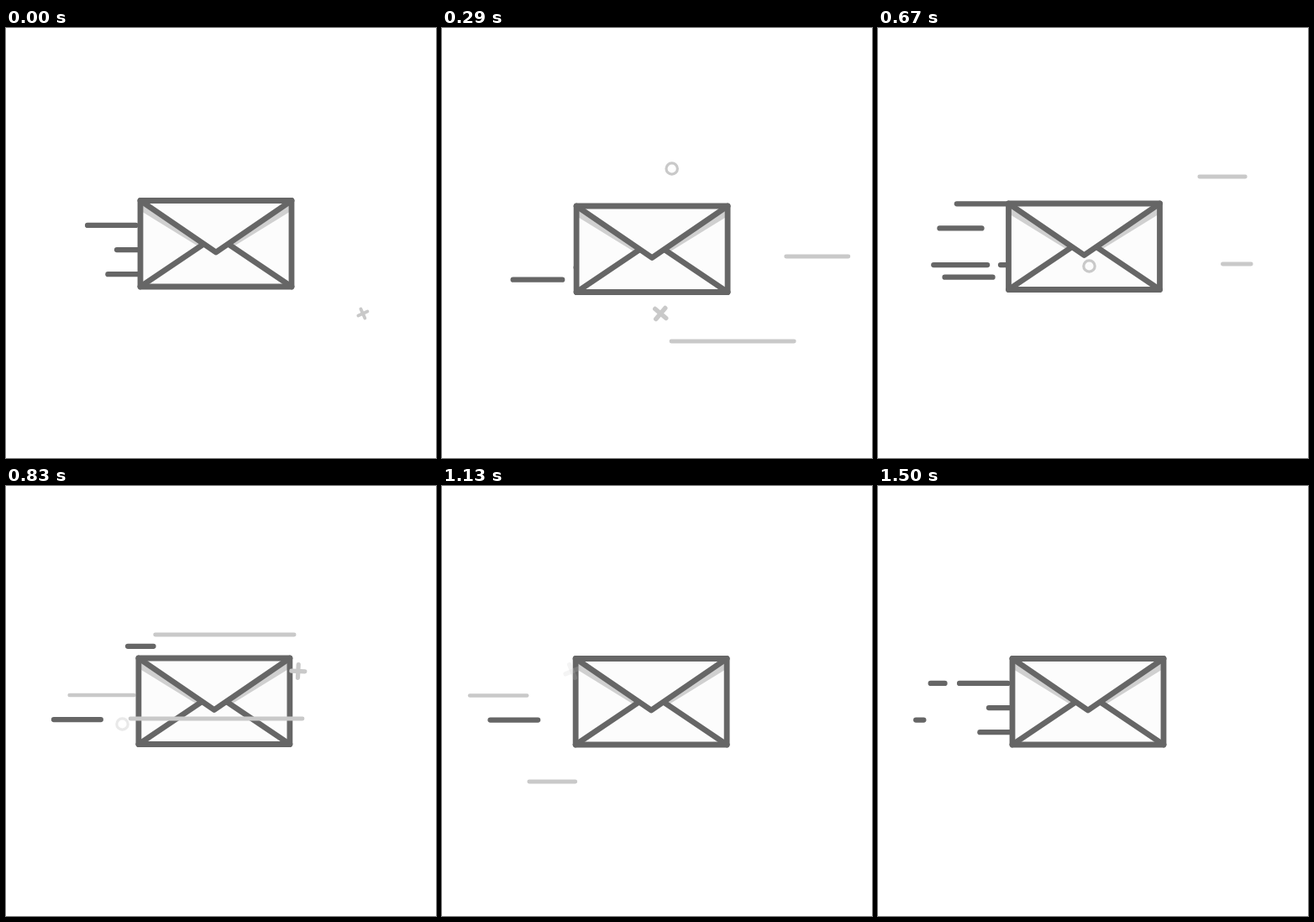
Write an HTML page with a canvas that moves like this. It is 512 px wide and 512 px high and loops after 1.54 s.

```html
<!DOCTYPE html>
<html lang="en">
<head>
<meta charset="utf-8">
<title>Flying envelope</title>
<style>
  html, body { margin: 0; height: 100%; overflow: hidden; background: #fff; }
  canvas { display: block; }
</style>
</head>
<body>
<canvas id="stage" width="512" height="512"></canvas>
<script>
const ctx = document.getElementById('stage').getContext('2d');
const DARK = '#666', LIGHT = '#c9c9c9', PAPER = '#fcfcfc';
const LOOP = 1540, STEP = 1000 / 24, LAST = 36;
const TRAIL_FROM = 178, TRAIL_LIFE = 7, MARK_LIFE = 10.5;

// Evenly spaced lanes behind the envelope: how far left they reach and when lines launch
const lanes = [
  { reach: 54, dark: [19] },
  { reach: 60, dark: [12.75] },
  { reach: 68, dark: [7.9, 19.9] },
  { reach: 62, dark: [-3.15, 11.2, 29.55] },
  { reach: 18, dark: [26.85], light: [8.2, 17.2, 22.15] },
  { reach: 80, dark: [-1.9] },
  { reach: 45, dark: [6.5, 11.8, 15.1, 22.15, 29.25] },
  { reach: 60, dark: [-1.95, 3.2, 11.85] }
];

// Wind in front of the envelope
const gusts = [
  { y: 373, start: 3.8, life: 7.4, from: 475, to: 177 },
  { y: 272, start: 6.1, life: 7.4, from: 489, to: 142 },
  { y: 177, start: 15.2, life: 8.9, from: 440, to: 107 },
  { y: 277.5, start: 15.6, life: 9.3, from: 445, to: 34, follows: true },
  { y: 352, start: 23.8, life: 8.3, from: 176, to: 60, follows: true }
];

// Crosses and rings blown to the left
const marks = [
  { start: -0.1, x: 427, y: 340, speed: 21 },
  { start: 0.2, x: 462.6, y: 167.5, speed: 25.4, ring: true },
  { start: 10.5, x: 388.6, y: 283.5, speed: 23, ring: true },
  { start: 17, x: 420, y: 220.5, speed: 23 }
];

// Key poses of the envelope: [step, dx, dy]
const drift = [
  [0, 0, 0], [4, -0.5, 6.5], [10, 0.7, 6.5], [16, -4.5, 3.5],
  [24, 0.3, -4.5], [30, -2, 4.5], [LAST, 0, 0]
];

function driftAt(n) {
  const i = Math.max(1, drift.findIndex(k => n <= k[0]));
  const [a, ax, ay] = drift[i - 1], [b, bx, by] = drift[i];
  const p = (n - a) / (b - a), e = p * p * (3 - 2 * p);
  return [ax + (bx - ax) * e, ay + (by - ay) * e];
}

function path(points, closed) {
  ctx.beginPath();
  points.forEach(([x, y]) => ctx.lineTo(x, y));
  if (closed) ctx.closePath();
}

function stroke(points, color, width, closed) {
  path(points, closed);
  ctx.strokeStyle = color;
  ctx.lineWidth = width;
  ctx.stroke();
}

function fill(points, color) {
  path(points, true);
  ctx.fillStyle = color;
  ctx.fill();
}

// The front eases out while the tail eases in, so the line grows and then shrinks.
function streak(p, y, from, to, color, width) {
  if (p <= 0 || p >= 1) return;
  const front = from + (to - from) * (1 - (1 - p) ** 2);
  const tail = from + (to - from) * p * p;
  stroke([[front, y], [tail, y]], color, width);
}

function trails(n, dy) {
  lanes.forEach(({ reach, dark, light = [] }, i) => {
    const y = 191.3 + 14.55 * i + dy;
    const launch = (age, color, width) =>
      streak(age / TRAIL_LIFE, y, TRAIL_FROM, reach, color, width);
    light.forEach(start => launch(n - start, LIGHT, 4.5));
    for (const start of dark) {
      launch(n - start, DARK, 6.3);
      launch(n - LAST - start, DARK, 6.3);
    }
  });
}

function envelope(dx, dy) {
  const l = 160, r = 340, t = 205.5, b = 308, mid = 250;
  const body = [[l, t], [r, t], [r, b], [l, b]];
  const flap = [[l, t], [mid, 267], [r, t]];
  ctx.save();
  ctx.translate(dx, dy);
  fill(body, PAPER);
  fill([[l, t], [l, t + 12], [mid, 273], [r, t + 12], [r, t]], '#d0d0d0');
  fill([[l, b], [mid, 247], [r, b]], PAPER);
  fill(flap, PAPER);
  stroke([[l, b], [235, 257.5]], DARK, 6.8);
  stroke([[r, b], [265, 257.5]], DARK, 6.8);
  stroke(flap, DARK, 6.8);
  stroke(body, DARK, 6.8, true);
  ctx.restore();
}

function mark(n, { ring, start, x, y, speed }) {
  const age = n - start;
  if (age < 0 || age >= MARK_LIFE) return;
  const size = (ring ? 6.7 : 8.5) * Math.min(1, 0.7 + 0.08 * age);
  ctx.save();
  ctx.globalAlpha = Math.min(1, (MARK_LIFE - age) / 2.5);
  ctx.translate(x - speed * age - 0.35 * age * age, y);
  if (ring) {
    ctx.beginPath();
    ctx.arc(0, 0, size, 0, Math.PI * 2);
    ctx.strokeStyle = LIGHT;
    ctx.lineWidth = 3.2;
    ctx.stroke();
  } else {
    ctx.rotate((65 + 9.2 * age) * Math.PI / 180);
    stroke([[-size, 0], [size, 0]], LIGHT, size * 0.65);
    stroke([[0, -size], [0, size]], LIGHT, size * 0.65);
  }
  ctx.restore();
}

function draw(n) {
  const [dx, dy] = driftAt(n);
  ctx.clearRect(0, 0, 512, 512);
  ctx.lineCap = ctx.lineJoin = 'round';
  trails(n, dy);
  envelope(dx, dy);
  for (const { y, start, life, from, to, follows } of gusts) {
    streak((n - start) / life, follows ? y + dy : y, from, to, LIGHT, 4.8);
  }
  marks.forEach(m => mark(n, m));
}

function tick() {
  const time = performance.now() % LOOP;
  draw(Math.min(LAST, Math.floor((time + 3.4) / STEP)));
  requestAnimationFrame(tick);
}
tick();
</script>
</body>
</html>
```
